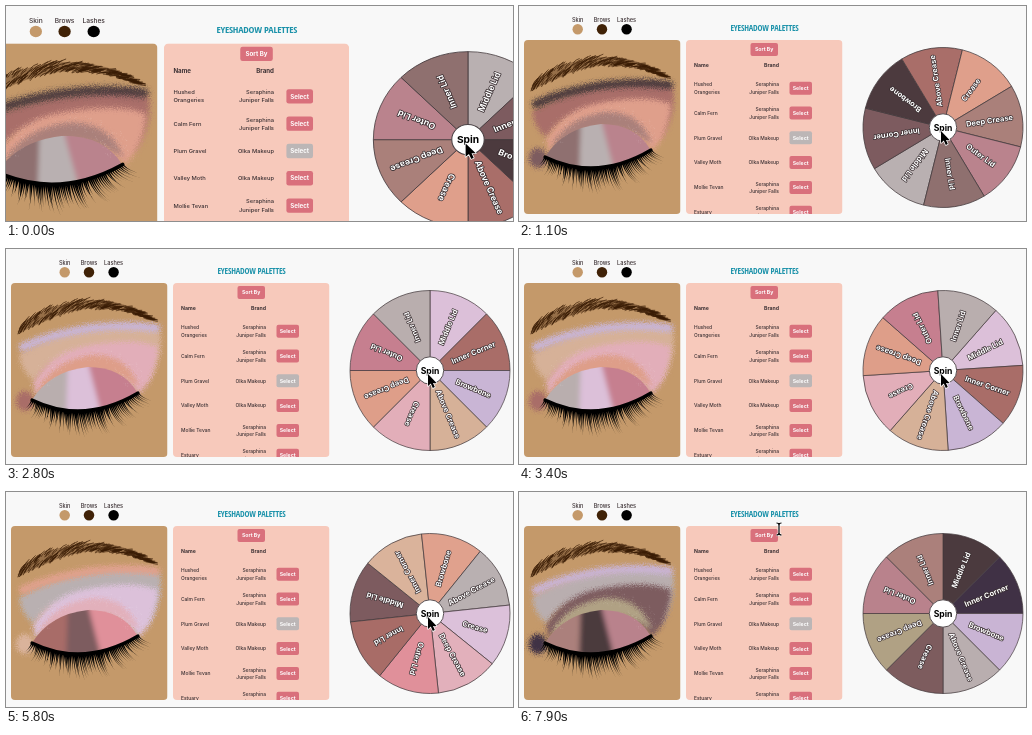
An HTML page that plays this animation: 507x215 px, repeating every 8000 ms.

```html
<!DOCTYPE html>
<html lang="en">
<head>
<meta charset="utf-8">
<title>Eyeshadow wheel</title>
<style>
  html, body { margin: 0; width: 100%; height: 100%; overflow: hidden; background: #f8f8f8; }
  svg { display: block; width: 507px; height: 215px; font: 500 4.9px Inter, sans-serif; fill: #3b3033; }
  .title { font: 700 8.4px "Open Sans Condensed", "Roboto Condensed", "Liberation Sans Narrow", Roboto, sans-serif; font-stretch: 75%; letter-spacing: -.2px; fill: #1c92aa; }
  .swatch { font-size: 5.6px; }
  .bold { font-weight: 700; font-size: 5.2px; }
  .button { font-weight: 700; font-size: 5.2px; fill: #fff; }
  .label { font-weight: 700; font-size: 7.6px; fill: #fff; stroke: #33282b; stroke-width: 1.3; paint-order: stroke; stroke-linejoin: round; }
  .mid { text-anchor: middle; }
  .end { text-anchor: end; }
</style>
</head>
<body>
<svg viewBox="0 0 507 215">
  <defs>
    <filter id="powder" x="-30%" y="-30%" width="160%" height="160%">
      <feGaussianBlur stdDeviation="2.2" result="soft"/>
      <feTurbulence type="fractalNoise" baseFrequency=".9" numOctaves="2" seed="4"/>
      <feDisplacementMap in="soft" scale="8" xChannelSelector="R" yChannelSelector="G"/>
    </filter>
    <filter id="blend" x="-30%" y="-30%" width="160%" height="160%"><feGaussianBlur stdDeviation="2.4"/></filter>
    <clipPath id="face"><rect x="5" y="34" width="156.5" height="174" rx="4"/></clipPath>
    <clipPath id="panel"><rect x="167" y="34" width="156.5" height="174" rx="4"/></clipPath>
    <clipPath id="lid"><path d="M26 151Q44 122 82 118Q116 118 131 143Q78 181 26 151"/></clipPath>
  </defs>
  <g id="page">
    <g id="swatches" class="mid"></g>
    <text class="title mid" x="245.5" y="24.6">EYESHADOW PALETTES</text>

    <g clip-path="url(#face)">
      <rect x="5" y="34" width="156.5" height="174" fill="#c4996a"/>
      <g filter="url(#powder)">
        <path fill="var(--c3)" d="M13 106Q45 85 100 79Q140 74 154 82Q158 108 142 133Q110 102 75 106Q40 110 28 132Q15 122 13 106"/>
      </g>
      <g filter="url(#powder)">
        <path fill="var(--c4)" d="M27 134Q45 102 85 96Q130 88 152 98Q150 130 133 145Q105 112 76 115Q46 119 30 147"/>
      </g>
      <g filter="url(#powder)">
        <path fill="var(--c5)" d="M35 136Q52 110 88 106Q122 106 133 138Q110 121 85 122Q55 124 33 145"/>
        <path fill="none" stroke="var(--c2)" stroke-width="8" stroke-linecap="round" d="M17 98Q45 85 85 79Q120 75 150 79"/>
        <ellipse fill="var(--c1)" cx="19" cy="152" rx="9" ry="10"/>
      </g>
      <g clip-path="url(#lid)">
        <g filter="url(#blend)">
          <path fill="var(--c7)" d="M15 110H65V172H15Z"/>
          <path fill="var(--c6)" d="M78 110H140V172H98Z"/>
          <path fill="var(--c0)" d="M62 110H81L97 172H60Z"/>
        </g>
      </g>
      <g id="sparkle" fill="#fff"></g>
      <path id="brow" fill="#3f2209" fill-opacity=".35"/>
      <path id="hairs" fill="none" stroke="#3a1d06" stroke-width=".65" stroke-linecap="round"/>
      <path d="M26 151Q78 176 132 144" fill="none" stroke="#000" stroke-width="3.2" stroke-linecap="round"/>
      <path id="lashes" fill="#000"/>
    </g>

    <g clip-path="url(#panel)">
      <rect x="167" y="34" width="156.5" height="174" fill="#f7c9bb"/>
      <rect x="231.5" y="37" width="27.5" height="13" rx="2" fill="#d9707c"/>
      <text class="button mid" x="245.2" y="45.4">Sort By</text>
      <text class="bold" x="175" y="61">Name</text>
      <text class="bold end" x="260" y="61">Brand</text>
      <g id="rows"></g>
    </g>

    <g transform="translate(424 121.5)">
      <g id="wheel"></g>
      <circle r="13.7" fill="#fff" stroke="#4a4144" stroke-width=".9"/>
      <text class="mid" y="3" style="font-size:8.6px;font-weight:700;fill:#000">Spin</text>
    </g>

    <g id="cursor" stroke="#fff" stroke-linejoin="round" paint-order="stroke">
      <path id="arrow" fill="#000" stroke-width="1.4" d="M0 0V12L2.8 9.6L4.8 14L6.8 13L5 8.9H8.6Z"/>
      <g id="beam" fill="none">
        <path stroke-width="2.6" d="M-2.5-6Q0-6 0-4V4Q0 6-2.5 6M2.5-6Q0-6 0-4M0 4Q0 6 2.5 6"/>
        <path stroke="#000" stroke-width="1.2" d="M-2.5-6Q0-6 0-4V4Q0 6-2.5 6M2.5-6Q0-6 0-4M0 4Q0 6 2.5 6"/>
      </g>
    </g>
  </g>
</svg>
<script>
const $ = id => document.getElementById(id);
const text = (x, y, s, cls = '') => `<text x="${x}" y="${y}" class="${cls}">${s}</text>`;
const bezier = (a, b, c, u) => a * (1 - u) ** 2 + 2 * b * u * (1 - u) + c * u * u;
const clamp = v => Math.max(0, Math.min(1, v));
const smooth = v => (v = clamp(v)) * v * (3 - 2 * v);

let seed = 7;
const rand = () => (seed = seed * 16807 % 2147483647) / 2147483647;

// Swatches
$('swatches').innerHTML = [['Skin', 58.7, '#c4996a'], ['Brows', 83, '#402207'], ['Lashes', 107.6, '#000']]
  .map(([name, x, fill]) => text(x, 15.6, name, 'swatch') + `<circle cx="${x}" cy="23.2" r="5.2" fill="${fill}"/>`).join('');

// Palette list: names and brands wrap at "|"
const brandA = 'Seraphina|Juniper Falls', brandB = 'Olka Makeup';
const lines = (x, y, s, cls) => s.split('|')
  .map((part, i, all) => text(x, y + 1.8 + (i - (all.length - 1) / 2) * 7.4, part, cls)).join('');
$('rows').innerHTML = [
  ['Hushed|Orangeries', brandA], ['Calm Fern', brandA], ['Plum Gravel', brandB],
  ['Valley Moth', brandB], ['Mollie Tevan', brandA], ['Estuary', brandA]
].map(([name, brand], i) => {
  const y = 82.2 + i * 24.8;
  return lines(175, y, name) + lines(260, y, brand, 'end') +
    `<rect x="270.5" y="${y - 6.5}" width="22.5" height="13" rx="2" fill="${i == 2 ? '#bcb6b6' : '#d9707c'}"/>` +
    text(281.7, y + 1.9, 'Select', 'button mid');
}).join('');

// Brow
const browAt = u => [bezier(14, 84, 150, u), bezier(81, 34, 72, u), 7.5 * Math.sqrt(1 - u) * Math.min(1, .5 + 3 * u)];
const edge = side => Array.from({ length: 31 }, (_, i) => {
  const [x, y, h] = browAt(i / 30);
  return `${x} ${y + side * h * .8}`;
});
$('brow').setAttribute('d', 'M' + [...edge(-1), ...edge(1).reverse()].join('L') + 'Z');
let hairs = '';
for (let i = 0; i < 260; i++) {
  const u = rand() * .97, [x, y, h] = browAt(u);
  const y0 = y + h * (rand() * 1.8 - .6), rise = 7 - 10 * u + rand() * 2;
  hairs += `M${x - 2} ${y0}q2 ${-rise * .7} ${5 + 3 * u} ${-rise}`;
}
$('hairs').setAttribute('d', hairs);

// Lashes fan out from the lid line
let lashes = '';
for (let i = 0; i < 72; i++) {
  const u = i / 71, x = bezier(26, 78, 132, u), y = bezier(151, 176, 144, u);
  const size = .7 + rand() * .35;
  const dx = (-9 + 31 * u + rand() * 7 - 3.5) * size;
  const dy = (13 + 16 * Math.sin(Math.PI * u) - 3 * u) * size;
  const bend = `${x + dx * .3} ${y + dy * .65}`;
  lashes += `M${x - .9} ${y}Q${bend} ${x + dx} ${y + dy}Q${bend} ${x + .9} ${y}Z`;
}
$('lashes').setAttribute('d', lashes);

// Shimmer
let dots = '';
for (let i = 0; i < 240; i++) {
  const a = Math.PI * (1 + rand()), r = .75 + rand() * .5;
  dots += `<circle cx="${82 + 47 * r * Math.cos(a)}" cy="${138 + 34 * r * Math.sin(a)}" r=".4" opacity="${.08 + rand() * .22}"/>`;
}
$('sparkle').innerHTML = dots;

// Wheel
const parts = ['Middle Lid', 'Inner Corner', 'Browbone', 'Above Crease', 'Crease', 'Deep Crease', 'Outer Lid', 'Inner Lid'];
const R = 80, D = R * Math.SQRT1_2;
$('wheel').innerHTML = parts.map((_, i) =>
  `<path transform="rotate(${i * 45})" d="M0 0V${-R}A${R} ${R} 0 0 1 ${D} ${-D}Z" fill="var(--c${i})" stroke="#443a3d" stroke-width=".7"/>`
).join('') + parts.map((name, i) =>
  `<g transform="rotate(${i * 45 - 67.5})">${text(47, 2.7, name, 'label mid')}</g>`).join('');

// Colours in wheel order, one set per spin
const looks = [
  '#b9b0b1 #7d5b5f #4c3a3e #a96e69 #df9f8b #aa807a #ba838d #8f706f',
  '#dcc0d9 #a96d68 #c9b5d5 #d6b198 #e2aeb9 #de9e89 #c67f8f #b9aeae',
  '#7d5b5f #dab39b #e0a18d #b9b0b1 #dcc1da #e2b0bb #e0909a #a86c67',
  '#4b3a3e #403145 #c9b4d4 #b9aeaf #7d5c5e #b0a184 #b9828c #ab807b'
].map(s => s.split(' '));
const spins = [575, 3190, 5140], SPIN = 1000, LOOP = 8000;
let shown = -1;

function draw(now) {
  const t = now % LOOP;

  const zoom = 1 - smooth(t / 500);
  $('page').setAttribute('transform', `translate(${-39.6 * zoom}) scale(${1 + .183 * zoom} ${1 + .1 * zoom})`);

  const look = spins.filter(s => t >= s + SPIN).length;
  if (look != shown) {
    looks[look].forEach((c, i) => $('page').style.setProperty('--c' + i, c));
    shown = look;
  }
  const turn = spins.reduce((sum, s) => sum + smooth((t - s) / SPIN), 0) * 360;
  $('wheel').setAttribute('transform', `rotate(${turn % 360})`);

  const move = smooth((t - 7100) / 700);
  const x = 422 - 162 * move, y = 125 - 88 * move, overText = x < 285;
  $('cursor').setAttribute('transform', `translate(${x} ${y})`);
  $('arrow').style.display = overText ? 'none' : '';
  $('beam').style.display = overText ? '' : 'none';
}

const start = performance.now();
(function tick() {
  draw(performance.now() - start);
  requestAnimationFrame(tick);
})();
</script>
</body>
</html>
```
